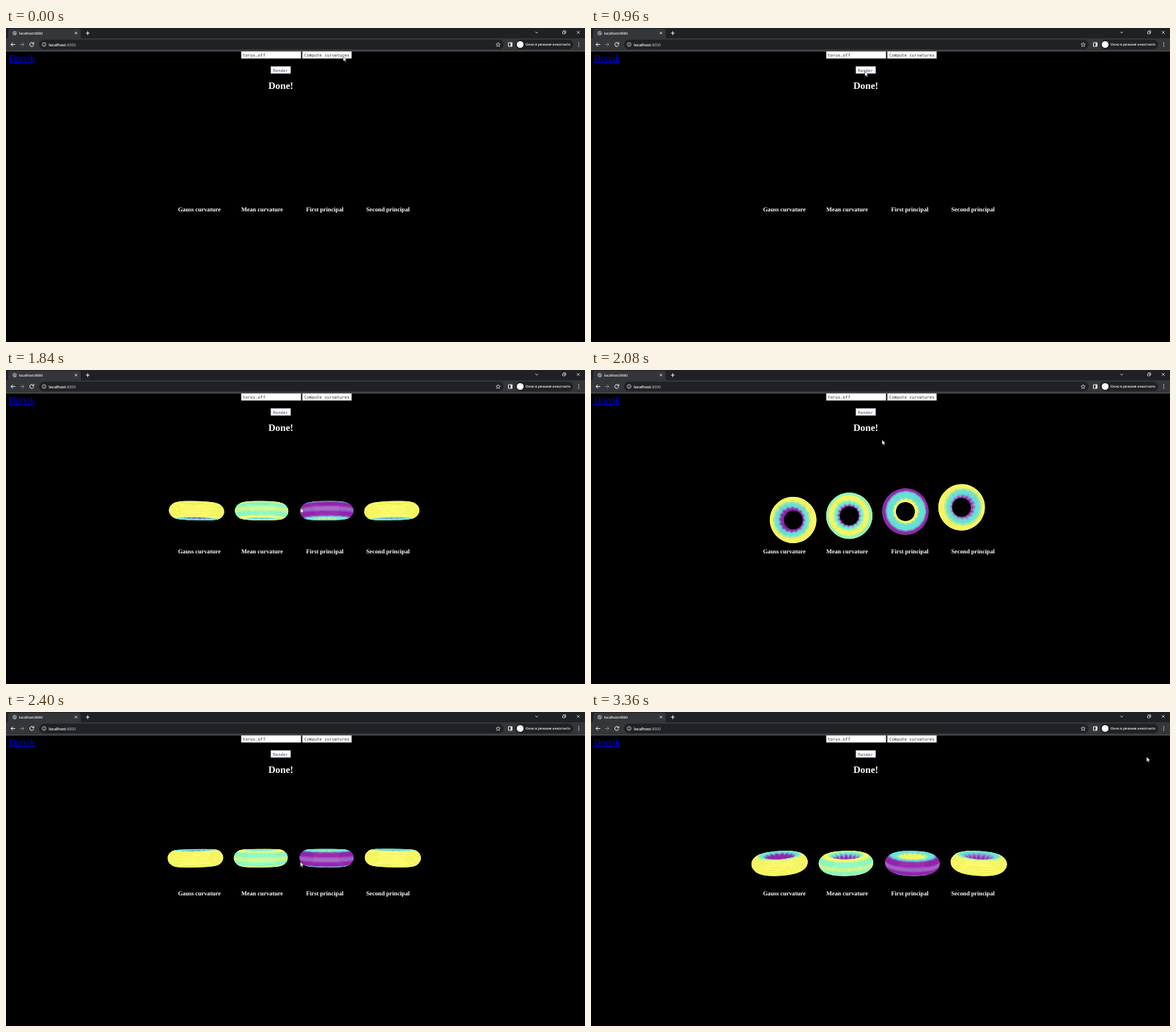
An HTML page with a canvas for the animation above (3440 ms loop, 790 px wide and 428 px high).

```html
<!DOCTYPE html>
<html lang="en">
<head>
<meta charset="utf-8">
<title>localhost:8000</title>
<style>
  html, body { margin: 0; width: 100%; height: 100%; overflow: hidden; background: #000; }
  svg, canvas { position: absolute; left: 0; top: 0; }
  text { text-rendering: geometricPrecision; white-space: pre; }
  .ui { font-family: "Open Sans", sans-serif; font-weight: 600; fill: #fff; }
  .page { font-family: "Liberation Serif", serif; font-weight: bold; font-size: 8.25px; fill: #fff; }
  .mono { font-family: "DejaVu Sans Mono", monospace; font-size: 5.7px; fill: #333; }
  .icon { fill: none; stroke: #e8eaed; stroke-width: 1; }
</style>
</head>
<body>
<svg width="790" height="428" viewBox="0 0 790 428">
  <!-- browser window -->
  <rect width="790" height="31" fill="#202124"/>
  <path d="M0 14H1Q3 14 3 12V4Q3 1 6 1H99Q102 1 102 4V12Q102 14 104 14H790V31H0Z" fill="#35363a"/>
  <rect y="31" width="790" height="1" fill="#55565a"/>
  <rect x="45" y="16" width="634" height="13" rx="6.5" fill="#202124"/>
  <rect x="695" y="16" width="79" height="13" rx="6.5" fill="#202124"/>
  <circle cx="11.8" cy="7" r="2.9" fill="#9aa0a6"/>
  <path d="M9.5 5.5L11.5 7L10.8 9M12 4.5L14 7.5" fill="none" stroke="#35363a" stroke-width=".8"/>
  <g class="icon">
    <path d="M94 5.4l3 3m0-3l-3 3M109 7h5M111.5 4.5v5"/>
    <path d="M12.5 22.5H7M9.4 19.9L6.8 22.5L9.4 25.1"/>
    <path d="M19 22.5h5.5M22 19.9l2.6 2.6l-2.6 2.6" stroke="#808388"/>
    <path d="M37.3 20.8A2.7 2.7 0 1 0 37.8 23M38 19.3v2.3h-2.4"/>
    <circle cx="52" cy="22.5" r="2.6" stroke-width=".7"/>
    <path d="M52 22.2v1.8M52 20.8v.7" stroke-width=".7"/>
    <path d="M671.5 19.8l.8 1.9 2 .2-1.5 1.4.5 2-1.8-1.1-1.8 1.1.5-2-1.5-1.4 2-.2z" stroke-width=".7"/>
    <path d="M685.5 20h5v5h-5z"/>
    <path d="M689.5 20v5" stroke-width="2"/>
    <path d="M722.3 5.3l1.8 1.7 1.8-1.7" stroke-width=".8"/>
    <path d="M759.5 5h3v3h-3zM760.5 4.5v-.7h3.2v3.2h-.8" stroke-width=".7"/>
    <path d="M779 4.2l3.6 3.6m0-3.6l-3.6 3.6" stroke-width=".8"/>
  </g>
  <circle cx="701.5" cy="22.5" r="4.6" fill="#fff"/>
  <g fill="#e8eaed">
    <circle cx="781.5" cy="20.3" r=".7"/><circle cx="781.5" cy="22.6" r=".7"/><circle cx="781.5" cy="24.9" r=".7"/>
  </g>
  <text class="ui" x="18" y="8.9" font-size="4.6">localhost:8000</text>
  <text class="ui" x="58.3" y="24.6" font-size="5.35">localhost<tspan fill="#9aa0a6">:8000</tspan></text>
  <text class="ui" x="709" y="24.2" font-size="4.55">Окно в режиме инкогнито</text>

  <!-- page -->
  <text x="4" y="45" font-family="Liberation Serif, serif" font-size="12.4" fill="#0000ee" text-decoration="underline">Dorvik</text>
  <g fill="#fff" stroke="#999" stroke-width=".5">
    <rect x="321" y="32" width="81.5" height="9.5"/>
    <rect x="404.2" y="32" width="67.3" height="9.5"/>
    <rect x="361.3" y="52.3" width="27" height="9.7"/>
  </g>
  <text class="mono" x="323" y="38.8">torus.off</text>
  <text class="mono" x="407" y="38.8">Compute curvatures</text>
  <text class="mono" x="364.3" y="59.5" style="fill:#4a4a80">Render</text>
  <text class="page" x="358" y="83" style="font-size:13.3px">Done!</text>
  <text class="page" x="234.7" y="250.3">Gauss curvature</text>
  <text class="page" x="321" y="250.3">Mean curvature</text>
  <text class="page" x="409.5" y="250.3">First principal</text>
  <text class="page" x="491.5" y="250.3">Second principal</text>
</svg>
<canvas id="view" width="790" height="428"></canvas>
<svg width="790" height="428" viewBox="0 0 790 428">
  <path id="cursor" d="M0 0V7L1.6 5.6L2.7 8L3.9 7.5L2.9 5.1H5Z" fill="#fff" stroke="#000" stroke-width=".5"/>
</svg>
<script>
const LOOP = 3440, STEP = 80, SHOW = 1120;
const ctx = document.getElementById('view').getContext('2d');
const cursor = document.getElementById('cursor');

// time, tip x, tip y
const cursorKeys = [
  [0, 460, 38.5], [560, 373.5, 59], [1440, 373.5, 59], [1840, 402, 188], [1920, 402, 188],
  [2080, 397, 95], [2240, 400, 186], [2400, 401.5, 204], [2560, 401.5, 207],
  [2640, 401.5, 207], [2800, 728, 41], [2960, 728, 41], [3360, 758, 61]
];
// time, elevation, yaw, roll in degrees
const poseKeys = [
  [1920, -1.5, 0, 0], [2080, -90, 0, 4.3], [2240, -34.5, 5, 2.2],
  [2400, 8, 1, 0], [2480, 15.5, 0, 0], [2560, 17, 0, 0]
];
// colour by cosine of the tube angle: -1 inner side, 1 outer side
const PURPLE = [155, 38, 178], LILAC = [165, 110, 205], TEAL = [108, 232, 222],
      MINT = [145, 255, 200], YELLOW = [255, 255, 105];
const palettes = [
  [[-1, ...PURPLE], [-.8, ...PURPLE], [-.45, ...TEAL], [-.1, ...TEAL], [.4, ...YELLOW]],
  [[-1, ...PURPLE], [-.88, ...LILAC], [-.7, ...TEAL], [-.35, ...MINT], [-.05, ...YELLOW],
   [.4, ...YELLOW], [.7, ...MINT], [.93, ...MINT], [1, 215, 255, 145]],
  [[-1, ...YELLOW], [-.75, ...YELLOW], [-.45, ...TEAL], [.3, ...TEAL], [.65, ...PURPLE],
   [.93, ...PURPLE], [1, ...LILAC]],
  [[-1, ...PURPLE], [-.85, ...LILAC], [-.5, ...TEAL], [-.1, ...TEAL], [.4, ...YELLOW]]
];

// piecewise linear lookup: the first entry of each key is its position
function sample(keys, x) {
  const n = keys.findIndex(k => k[0] > x);
  if (n < 0) return keys[keys.length - 1].slice(1);
  if (n === 0) return keys[0].slice(1);
  const a = keys[n - 1], b = keys[n], f = (x - a[0]) / (b[0] - a[0]);
  return a.slice(1).map((v, i) => v + (b[i + 1] - v) * f);
}

function projector(pose) {
  const [e, y, r] = pose.map(d => d * Math.PI / 180);
  const [ce, se, cy, sy, cr, sr] = [e, y, r].flatMap(a => [Math.cos(a), Math.sin(a)]);
  return (px, py, pz) => {
    const up = py * ce - pz * se, near = py * se + pz * ce;
    const x = px * cy - near * sy, z = near * cy + px * sy;
    const s = 480 / (480 - z);
    return [393.2 + (x * cr - up * sr) * s, 228.6 - (x * sr + up * cr) * s, z];
  };
}

const NU = 80, NV = 40, RING = 23.8, TUBE = 9.4, SPACING = 82;

function drawTorus(index, project) {
  const vertex = (i, j) => {
    const u = i / NU * 2 * Math.PI, v = j / NV * 2 * Math.PI, d = RING + TUBE * Math.cos(v);
    return project((index - 1.5) * SPACING + d * Math.cos(u), 32.7 + TUBE * Math.sin(v), 35.1 + d * Math.sin(u));
  };
  const quads = [];
  for (let i = 0; i < NU; i++) for (let j = 0; j < NV; j++) {
    const a = vertex(i, j), b = vertex(i + 1, j), c = vertex(i + 1, j + 1), d = vertex(i, j + 1);
    const facing = (c[0] - a[0]) * (d[1] - b[1]) - (c[1] - a[1]) * (d[0] - b[0]);
    if (facing > 0) quads.push({ p: [a, b, c, d], z: a[2] + c[2], i, j });
  }
  quads.sort((a, b) => a.z - b.z);
  for (const { p, i, j } of quads) {
    const u = (i + .5) / NU * 2 * Math.PI, c = Math.cos((j + .5) / NV * 2 * Math.PI);
    const blotch = .05 * (1 - c) * Math.sin(16 * u); // only on the inner wall
    const rgb = sample(palettes[index], c + blotch).map(Math.round);
    ctx.fillStyle = ctx.strokeStyle = `rgb(${rgb})`;
    ctx.beginPath();
    p.forEach(q => ctx.lineTo(q[0], q[1]));
    ctx.closePath();
    ctx.fill();
    ctx.stroke();
  }
}

let lastPose = '';
function draw(t) {
  cursor.setAttribute('transform', `translate(${sample(cursorKeys, t)})`);
  const pose = t < SHOW ? null : sample(poseKeys, t);
  if (String(pose) === lastPose) return;
  lastPose = String(pose);
  ctx.clearRect(0, 0, 790, 428);
  if (!pose) return;
  ctx.lineWidth = .5;
  const project = projector(pose);
  palettes.forEach((_, i) => drawTorus(i, project));
}

const start = performance.now();
function tick() {
  const t = (performance.now() - start) % LOOP;
  draw(Math.floor(t / STEP) * STEP);
  requestAnimationFrame(tick);
}
tick();
</script>
</body>
</html>
```
